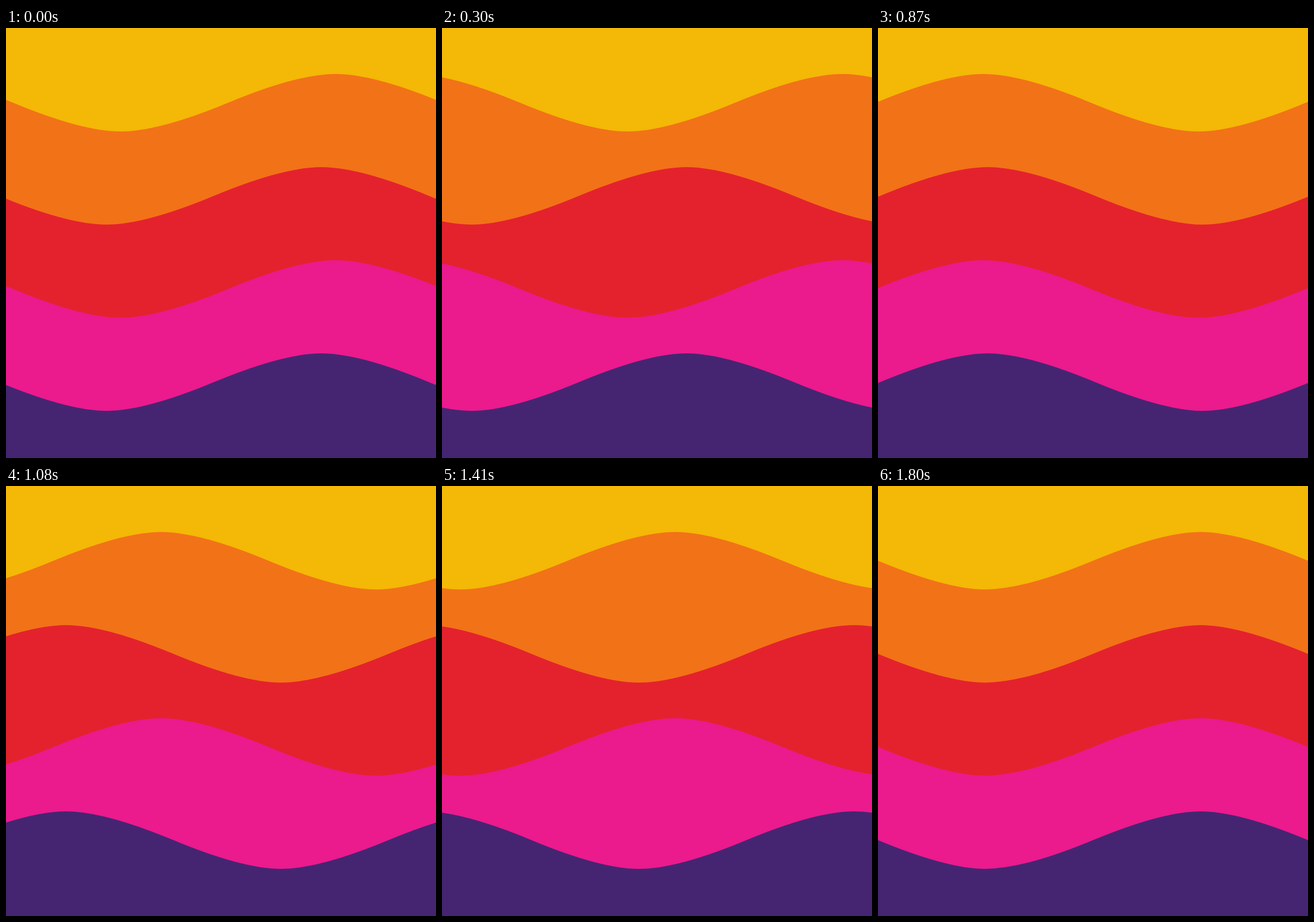
These frames come from a looping animation (748x748 px, 1830 ms). An HTML page:

```html
<!DOCTYPE html>
<html lang="en">
<head>
<meta charset="utf-8">
<title>Waves</title>
<style>
  html, body { margin: 0; height: 100%; overflow: hidden; background: #f4b806; }
  svg { display: block; width: 100vw; height: 100vh; }
</style>
</head>
<body>
<svg viewBox="0 0 748 748"></svg>
<script>
const SIZE = 748, QUARTER = SIZE / 4, AMP = 50;
const STEP_MS = 30, STEPS = 61;
const STEP_X = SIZE * 33 / 2000;
const colors = ['#f27218', '#e4222d', '#eb1a8d', '#452572'];

const svg = document.querySelector('svg');

// Three wavelengths, each quarter a parabola that mirrors the one before.
function wavePath(y) {
  let d = `M${-SIZE} ${y}q120 ${AMP} ${QUARTER} ${AMP}`;
  for (let i = 1; i < 12; i++) {
    const rise = i % 4 === 1 || i % 4 === 2 ? -AMP : AMP;
    d += `t${QUARTER} ${rise}`;
  }
  return d + `V${SIZE}H${-SIZE}z`;
}

const waves = colors.map((color, i) => {
  const path = document.createElementNS(svg.namespaceURI, 'path');
  path.setAttribute('d', wavePath(130 + 162 * i));
  path.setAttribute('fill', color);
  return svg.appendChild(path);
});

function draw(time) {
  const step = Math.floor(time / STEP_MS) % STEPS;
  // The final step is cut short at one full wavelength.
  const shift = Math.min((step + 1) * STEP_X, SIZE);
  waves.forEach((wave, i) =>
    wave.setAttribute('transform', `translate(${i % 2 ? -shift : shift})`));
}

const start = performance.now();
function tick() {
  draw(performance.now() - start);
  requestAnimationFrame(tick);
}
tick();
</script>
</body>
</html>
```
